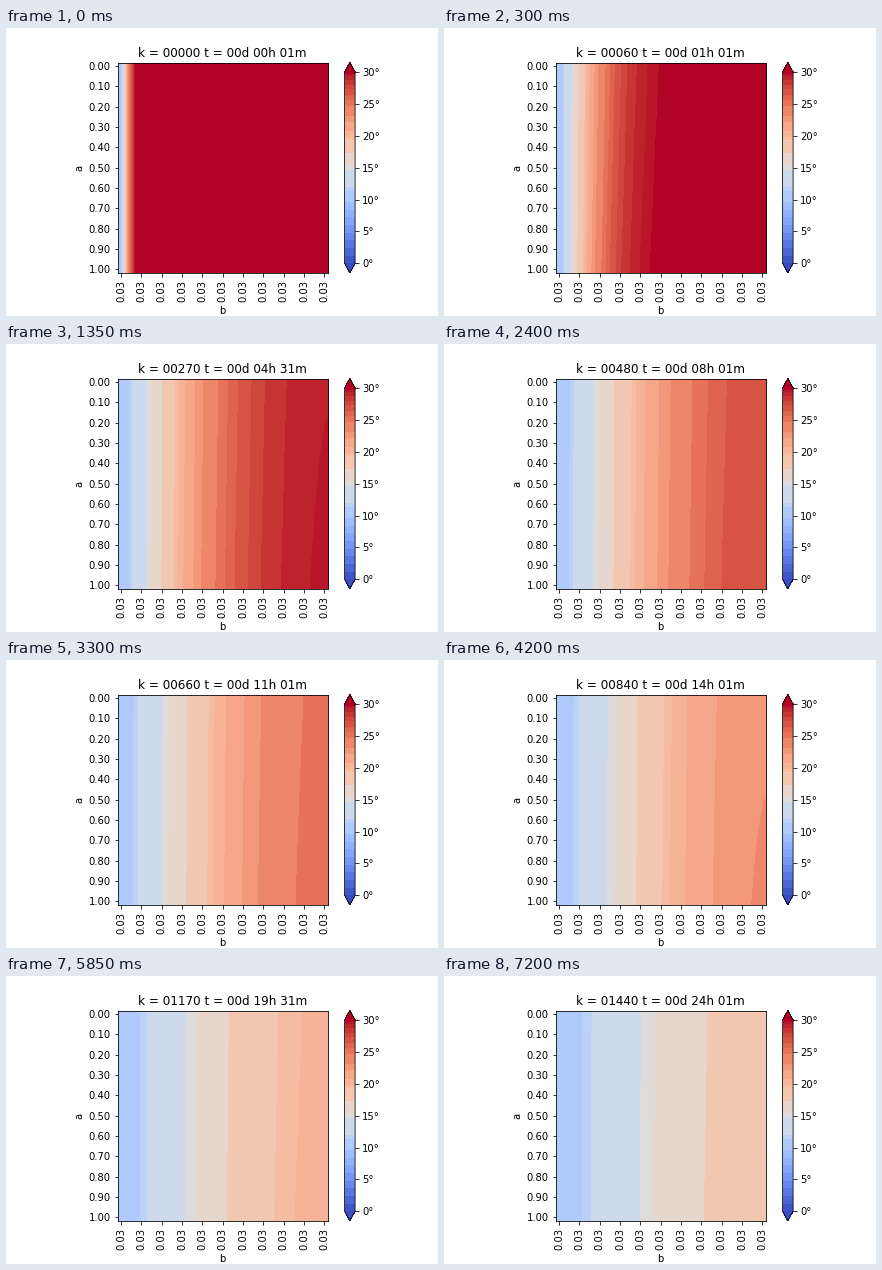
A matplotlib script that plays this animation: 432x288 px, repeating every 7.35 s.

```python
import numpy as np
import matplotlib.pyplot as plt
from matplotlib.animation import FuncAnimation
from matplotlib.colors import BoundaryNorm, ListedColormap

CELLS = 31
FRAMES = 49
STEP = 30            # minutes between pictures
COLD, WARM = 10.0, 30.0
RATE = 0.30          # diffusion number per one-minute step
LAG = 18.0           # minutes the last row trails the first


def simulate(steps):
    """Cooling wall: fixed cold left side, insulated right side."""
    temp = np.full(CELLS, WARM)
    temp[0] = COLD
    history = [temp]
    for _ in range(steps):
        padded = np.append(temp, temp[-1])
        temp = temp.copy()
        temp[1:] += RATE * (padded[2:] - 2 * padded[1:-1] + padded[:-2])
        history.append(temp)
    return np.array(history)


history = simulate(STEP * (FRAMES - 1) + 1)
rows = np.linspace(0, 1, CELLS)


def field(k):
    when = k + 1 - LAG * rows * k / (k + 40)
    low = np.minimum(when.astype(int), len(history) - 2)
    part = (when - low)[:, None]
    return history[low] * (1 - part) + history[low + 1] * part


def title_text(k):
    hours, minutes = divmod(k + 1, 60)
    return f"k = {k:05d} t = 00d {hours:02d}h {minutes:02d}m"


# Uneven colour bands
edges = np.concatenate([
    np.arange(0, 9.7, 1.2),
    [11.4, 11.95, 14.68, 15.37, 17.28, 19.3, 19.82, 20.75, 22.1, 23.1,
     24.7, 25.6, 26.4, 27.3, 28.0, 28.78, 29.35, 29.68, 30.0],
])
coolwarm = plt.get_cmap("coolwarm")
bands = coolwarm((edges[:-1] + edges[1:]) / 2 / WARM)
bands[-1] = coolwarm(1.0)
cmap = ListedColormap(bands)
cmap.set_under(coolwarm(0.0))
cmap.set_over(coolwarm(1.0))
norm = BoundaryNorm(edges, cmap.N)

plt.rcParams["font.family"] = "DejaVu Sans"
fig, ax = plt.subplots(figsize=(6, 4), dpi=72)
fig.subplots_adjust(bottom=0.15)

image = ax.imshow(field(0), cmap=cmap, norm=norm, interpolation="bilinear",
                  interpolation_stage="data")
title = ax.set_title(title_text(0))
ticks = np.arange(0, CELLS, 3)
ax.set_xticks(ticks, ["0.03"] * len(ticks), rotation=90)
ax.set_yticks(ticks, [f"{rows[i]:.2f}" for i in ticks])
ax.set_xlabel("b")
ax.set_ylabel("a")

bar = fig.colorbar(image, ax=ax, extend="both", spacing="proportional")
degrees = np.arange(0, 31, 5)
bar.set_ticks(degrees, labels=[f"{d}°" for d in degrees])
bar.minorticks_off()


def update(i):
    k = STEP * i
    image.set_data(field(k))
    title.set_text(title_text(k))
    return image, title


anim = FuncAnimation(fig, update, frames=FRAMES, interval=150,
                     repeat=True, repeat_delay=0)
plt.show()
```
